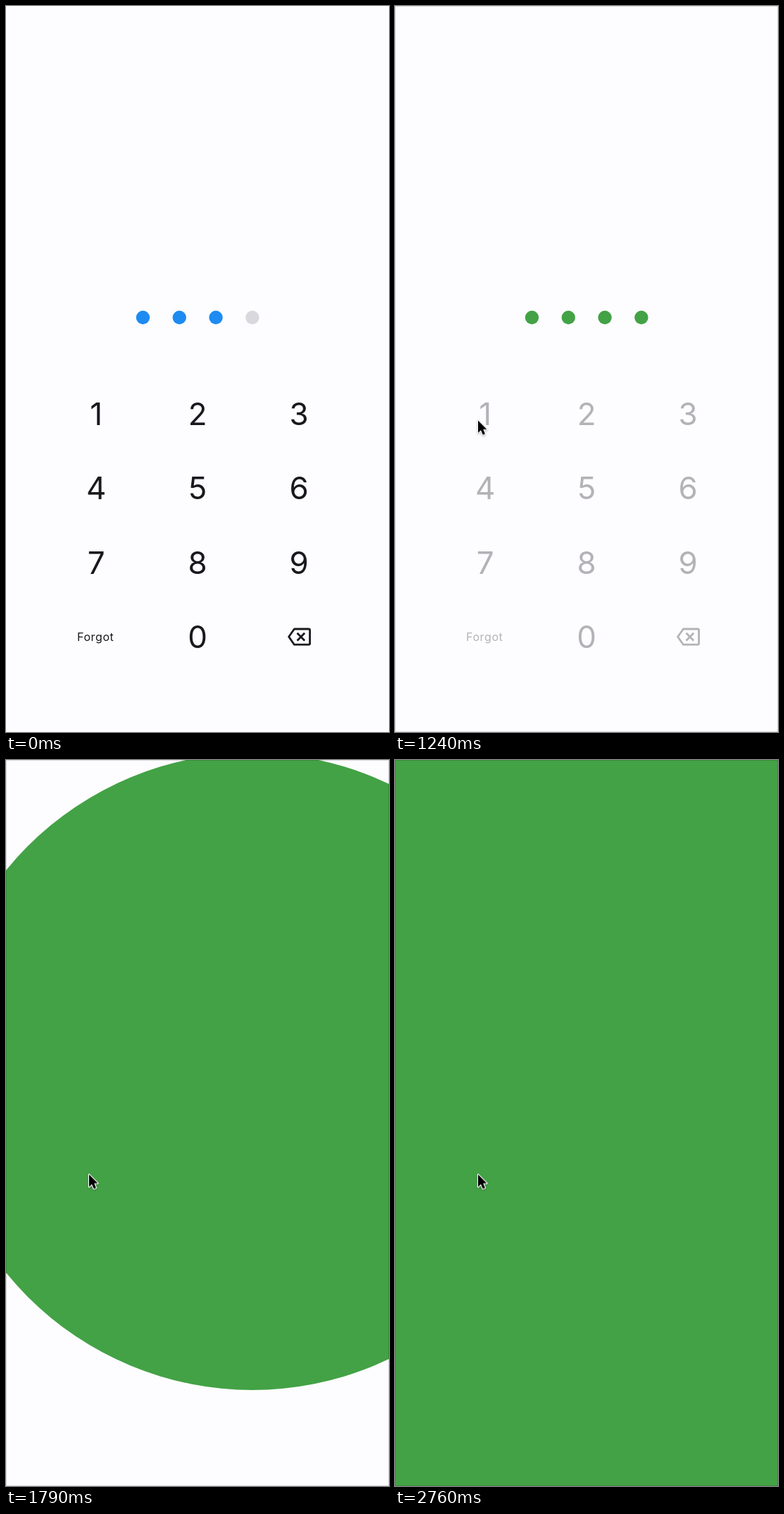
Animation, 544 px wide and 1029 px high, one loop 3760 ms. Source, as an HTML page:

```html
<!DOCTYPE html>
<html lang="en">
<head>
<meta charset="utf-8">
<title>Passcode</title>
<style>
  html, body { margin: 0; width: 100%; height: 100%; overflow: hidden; background: #fdfcff; }
  svg { display: block; width: 544px; height: 1029px; }
  text { font-family: Inter, "Open Sans", sans-serif; fill: #19181c; }
  .digit { font-size: 44px; text-anchor: middle; }
  .forgot { font-size: 16px; letter-spacing: .6px; }
  .icon { fill: none; stroke: #19181c; stroke-width: 2.8; stroke-linejoin: round; }
  .arrow { fill: #000; stroke: #fff; stroke-width: 2.4; stroke-linejoin: round; paint-order: stroke;
    filter: drop-shadow(0 1px 1px rgba(0, 0, 0, .3)); }
</style>
</head>
<body>
<svg viewBox="0 0 544 1029">
  <g id="keys">
    <text class="forgot" x="101" y="899.7">Forgot</text>
    <path class="icon" d="M401.7 894L409.5 883H430Q431.6 883 431.6 884.6V903.6Q431.6 905.2 430 905.2H409.5Z
      M413.6 888.8L424.2 899.4M424.2 888.8L413.6 899.4"/>
  </g>
  <g id="dots"></g>
  <rect id="edge" x=".5" y=".5" width="543" height="1028" fill="none" stroke="#000" stroke-opacity=".14"/>
  <g id="cursor"><path class="arrow" d="M0 0V17.5L4 13.8L6.8 20.3L10 19L7.2 12.6H12.5Z"/></g>
</svg>
<script>
const LOOP = 3760;
const BLUE = '#1e8bf2', GREEN = '#43a245', GREY = '#d9d8dc';
const $ = id => document.getElementById(id);

function add(parent, tag, attrs, text = '') {
  const el = document.createElementNS(parent.namespaceURI, tag);
  for (const name in attrs) el.setAttribute(name, attrs[name]);
  el.textContent = text;
  parent.append(el);
  return el;
}

// Each step: [time in ms, properties, easing towards the next step]
function play(el, steps) {
  const frames = steps.map(([ms, props, easing = 'linear']) => ({ ...props, offset: ms / LOOP, easing }));
  frames.push({ ...steps[steps.length - 1][1], offset: 1 });
  el.animate(frames, { duration: LOOP, iterations: Infinity });
}

const at = (x, y) => ({ transform: `translate(${x}px, ${y}px)` });

[...'123456789 0'].forEach((digit, i) => {
  if (digit === ' ') return;
  const x = 128.3 + 143.9 * (i % 3);
  const y = 594 + 105.3 * Math.floor(i / 3);
  add($('keys'), 'text', { class: 'digit', x, y }, digit);
});

const dots = [0, 1, 2, 3].map(i =>
  add($('dots'), 'circle', { cx: 194.5 + 51.8 * i, cy: 441.5, r: 9.7 }));

dots.forEach((dot, i) => {
  const first = i < 3 ? BLUE : GREY;
  play(dot, [
    [0, { fill: first }],
    [810, { fill: first }],
    [930, { fill: BLUE }],
    [990, { fill: BLUE }],
    [1110, { fill: GREEN }]
  ]);
});

// The last dot swells until it covers the stage
play(dots[3], [
  [0, { r: '9.7px' }],
  [1300, { r: '9.7px' }, 'cubic-bezier(.3, 0, .67, .6)'],
  [1640, { r: '298px' }],
  [1790, { r: '450.4px' }, 'cubic-bezier(.33, .41, .67, .77)'],
  [2090, { r: '690px' }]
]);

play($('keys'), [
  [0, { opacity: 1 }],
  [1110, { opacity: 1 }, 'cubic-bezier(.4, 0, .2, 1)'],
  [1410, { opacity: 0 }]
]);

play($('edge'), [
  [0, { opacity: 0 }],
  [780, { opacity: 0 }, 'step-end'],
  [781, { opacity: 1 }]
]);

play($('cursor'), [
  [0, at(-20, 800)],
  [30, at(-8, 787), 'cubic-bezier(.3, .4, .7, .85)'],
  [490, at(109, 612.5), 'ease-out'],
  [720, at(118, 587.5)]
]);
</script>
</body>
</html>
```
